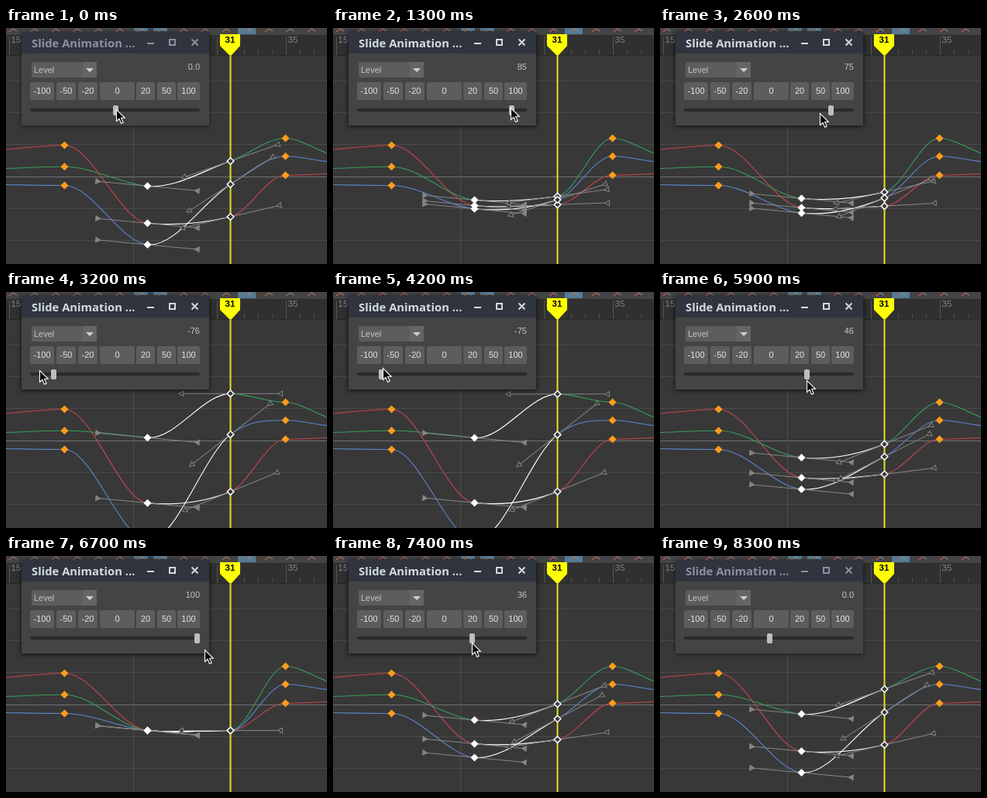
These frames come from a looping animation (414 px wide and 305 px high, 8.6 s). An HTML page with a canvas:

```html
<!DOCTYPE html>
<html lang="en">
<head>
<meta charset="utf-8">
<title>Curve slider</title>
<style>
html, body { margin: 0; width: 100%; height: 100%; overflow: hidden; background: #383838; }
#stage { position: relative; width: 414px; height: 305px; overflow: hidden; font: 11px "Liberation Sans", Arial, sans-serif; color: #c4c4c4; }
#stage * { position: absolute; box-sizing: border-box; }
#graph { left: 0; top: 0; }
#win { left: 20px; top: 5px; width: 242px; height: 121px; background: #444; box-shadow: 0 1px 5px rgba(0,0,0,.55); }
#win.active { box-shadow: 0 1px 6px rgba(0,0,0,.8); }
#bar { left: 0; top: 0; width: 242px; height: 28px; background: #2f343f; color: #8b929e; }
.active #bar { color: #d3dae3; }
#title { left: 13px; top: 3px; font: 600 14.8px/22px "Noto Sans", sans-serif; white-space: pre; }
#bar svg { left: 0; top: 0; }
#menu { left: 13px; top: 39px; width: 84px; height: 20px; background: #5d5d5d; padding-left: 3px; line-height: 20px; border-radius: 2px; }
#menu i { right: 0; top: 0; width: 18px; height: 20px; background: #656565; }
#menu i::after { content: ""; position: absolute; left: 4px; top: 8px; border: 5px solid transparent; border-top-color: #d0d0d0; border-bottom: 0; }
#value { right: 12px; top: 39px; line-height: 13px; }
.btn { top: 65px; height: 23px; background: #5d5d5d; border-radius: 2px; text-align: center; line-height: 23px; color: #e4e4e4; }
#track { left: 11px; top: 99px; width: 219px; height: 4px; background: #2a2a2a; border-radius: 2px; }
#thumb { top: 95px; left: 118px; width: 7px; height: 13px; background: #bdbdbd; border-radius: 2px; }
#cursor { left: 0; top: 0; overflow: visible; }
</style>
</head>
<body>
<div id="stage">
  <canvas id="graph" width="414" height="305"></canvas>
  <div id="win">
    <div id="bar">
      <span id="title">Slide Animation ...</span>
      <svg width="242" height="28" fill="none" stroke="currentColor" stroke-width="2">
        <path d="M162 15h9M192 10h6v7h-7v-7zM219.500 9.500l8 8m0-8l-8 8"/>
      </svg>
    </div>
    <div id="menu">Level<i></i></div>
    <span id="value">0.0</span>
    <div id="track"></div>
    <div id="thumb"></div>
  </div>
  <svg id="cursor" width="14" height="20">
    <path d="M.5 .5V15.500L4 12.300L6.600 18.300L9.200 17.200L6.600 11.300H11.300Z" fill="#000" stroke="#fff" stroke-width="1.1"/>
  </svg>
</div>
<script>
const LOOP = 8600, STEP = 100, MEAN = 225.5, FRAME = 17.85;
const X = [75.5, 182.5, 289.5, 360.5];
const $ = id => document.getElementById(id);
const ctx = $('graph').getContext('2d');

// edge heights, fixed keys and the two selected keys of each curve
const curves = [
  { color: '#c9444e', start: 157, first: 151.5, sel: [252.3, 244], last: 190.3, end: 188.5 },
  { color: '#35a05c', start: 181.5, first: 179.3, sel: [204.3, 172], last: 142.5, end: 161 },
  { color: '#5a86cc', start: 202.5, first: 203.5, sel: [280, 202], last: 165.7, end: 172.5 }
];

// time, slider value, pointer x, pointer y
const drag = [
  [0, 0, 142, 105], [200, 0, 142, 105], [500, 16, 158, 105], [800, 46, 189, 104],
  [1100, 72, 217, 104], [1300, 85, 229, 103], [1700, 100, 249, 103], [2000, 100, 257, 103],
  [2200, 100, 258, 103], [2300, 99, 244, 104], [2600, 75, 206, 110], [2800, 35, 146, 107],
  [3100, -64, 60, 102], [3400, -100, 10, 100], [3600, -100, 1, 99], [3700, -100, 1, 99],
  [4200, -75, 64, 98], [4600, -50, 90, 104], [5100, 3, 142, 108], [5400, 3, 142, 108],
  [6300, 80, 226, 118], [6500, 96, 247, 120], [6700, 100, 256, 121], [6900, 93, 240, 119],
  [7200, 46, 189, 113], [7600, 26, 168, 110], [7700, 26, 168, 110], [7800, 0, 170, 92],
  [8100, 0, 186, -25]
];

function poseAt(t) {
  const i = drag.findIndex(k => k[0] > t);
  if (i < 0) return drag[drag.length - 1];
  const a = drag[i - 1], b = drag[i];
  const u = (t - a[0]) / (b[0] - a[0]);
  return a.map((n, j) => n + (b[j] - n) * u);
}

function line(x1, y1, x2, y2, color, width = 1) {
  ctx.strokeStyle = color;
  ctx.lineWidth = width;
  ctx.beginPath();
  ctx.moveTo(x1, y1);
  ctx.lineTo(x2, y2);
  ctx.stroke();
}

function rect(x, y, w, h, color) {
  ctx.fillStyle = color;
  ctx.fillRect(x, y, w, h);
}

function poly(points, fill, stroke, width = 1) {
  ctx.beginPath();
  points.forEach(p => ctx.lineTo(...p));
  ctx.closePath();
  if (fill) { ctx.fillStyle = fill; ctx.fill(); }
  if (stroke) { ctx.strokeStyle = stroke; ctx.lineWidth = width; ctx.stroke(); }
}

function diamond(x, y, r, fill, stroke) {
  poly([[x, y - r], [x + r, y], [x, y + r], [x - r, y]], fill, stroke, 1.5);
}

// cubic with handles at a third of the span
function segment(x1, y1, s1, x2, y2, s2, color) {
  const d = (x2 - x1) / 3;
  ctx.strokeStyle = color;
  ctx.lineWidth = 1.1;
  ctx.beginPath();
  ctx.moveTo(x1, y1);
  ctx.bezierCurveTo(x1 + d, y1 + s1 * d, x2 - d, y2 - s2 * d, x2, y2);
  ctx.stroke();
}

function handles(x, y, slope, filled) {
  const color = '#858585';
  ctx.save();
  ctx.translate(x, y);
  ctx.rotate(Math.atan(slope));
  line(-64, 0, 64, 0, color);
  for (const side of [-1, 1]) {
    // filled markers point at the key, as do the hollow ones on the right
    const inward = filled || side > 0 ? 1 : -1;
    const tip = side * 64 - side * inward * 3, base = side * 64 + side * inward * 3;
    poly([[tip, 0], [base, -3.3], [base, 3.3]], filled ? color : '#383838', color);
  }
  ctx.restore();
}

// flat at extremes, otherwise limited to three times the gentler side
function autoSlope(y0, y1, y2) {
  const a = (y1 - y0) / (X[2] - X[1]), b = (y2 - y1) / (X[3] - X[2]);
  if (a * b <= 0) return 0;
  const mid = (y2 - y0) / (X[3] - X[1]);
  return Math.sign(mid) * Math.min(Math.abs(mid), 3 * Math.abs(a), 3 * Math.abs(b));
}

function drawToolbar() {
  rect(0, 0, 414, 9, '#444');
  rect(165, 0, 18, 4, '#527c96');
  rect(190, 0, 18, 4, '#527c96');
  rect(299, 0, 23, 8, '#527c96');
  for (let x = 4; x < 414; x += 27.5) {
    line(x, 5, x + 5, 1, '#b9653f', 1.3);
    line(x + 5, 1, x + 10, 4, '#9a9a9a');
  }
}

function drawRuler() {
  rect(0, 9, 414, 26, '#303030');
  ctx.font = '11.5px "Liberation Sans", Arial, sans-serif';
  for (let f = 15; f <= 38; f++) {
    const x = Math.round(X[2] + (f - 31) * FRAME) + .5;
    const major = f % 5 === 0;
    line(x, major ? 11 : 28, x, 35, major ? '#555' : '#4b4b4b');
    ctx.fillStyle = '#858585';
    if (major) ctx.fillText(f, x + 2, 19);
  }
  line(0, 35.5, 414, 35.5, '#292929');
}

function drawGraph(v) {
  rect(0, 0, 414, 305, '#383838');
  for (let y = 68.5; y < 305; y += 41.2) line(0, Math.floor(y) + .5, 414, Math.floor(y) + .5, '#4a4a4a');
  line(0, 192.5, 414, 192.5, '#747474');
  line(164.5, 35, 164.5, 305, '#4d4d4d');
  drawToolbar();
  drawRuler();

  const live = curves.map(c => {
    const [a, b] = c.sel.map(y => y + (MEAN - y) * v / 100);
    return { ...c, a, b, slope: autoSlope(a, b, c.last) };
  });
  const inSlope = .095;
  for (const c of live) {
    segment(-32, c.start + (c.start - c.first) * .3, 0, X[0], c.first, 0, c.color);
    segment(X[0], c.first, 0, X[1], c.a, inSlope, c.color);
    segment(X[2], c.b, c.slope, X[3], c.last, 0, c.color);
    segment(X[3], c.last, 0, 430, c.end + (c.end - c.last) * .2, 0, c.color);
    segment(X[1], c.a, inSlope, X[2], c.b, c.slope, '#fff');
  }
  for (const c of live) {
    handles(X[1], c.a, inSlope, true);
    handles(X[2], c.b, c.slope, false);
  }

  line(289.5, 30, 289.5, 305, '#e6e01c', 2);
  poly([[276, 8], [302, 8], [302, 23], [291, 35], [288, 35], [276, 23]], '#ffff00');
  ctx.fillStyle = '#000';
  ctx.font = 'bold 11.5px "Liberation Sans", Arial, sans-serif';
  ctx.fillText('31', 282.5, 19);

  for (const c of live) {
    diamond(X[0], c.first, 5, '#ff9c1c');
    diamond(X[3], c.last, 5, '#ff9c1c');
    diamond(X[1], c.a, 5, '#fff');
    diamond(X[2], c.b, 4.3, '#383838', '#fff');
  }
}

// label, left edge, width
[[-100, 11, 31], [-50, 45, 25], [-20, 73, 25], [0, 101, 45], [20, 148, 24], [50, 175, 24], [100, 201, 29]]
  .forEach(([label, left, width]) => {
    const b = document.createElement('div');
    b.className = 'btn';
    b.textContent = label;
    b.style.left = left + 'px';
    b.style.width = width + 'px';
    $('win').append(b);
  });

function render(t) {
  const [, raw, x, y] = poseAt(t), v = Math.round(raw);
  drawGraph(v);
  $('value').textContent = t >= 300 && t < 7800 ? v : '0.0';
  $('thumb').style.transform = `translateX(${Math.round(v * 1.05)}px)`;
  $('cursor').style.transform = `translate(${Math.round(x)}px, ${Math.round(y)}px)`;
  $('win').className = t >= 300 && t < 8300 ? 'active' : '';
}

const begin = performance.now();
let shown = -1;
function tick() {
  const t = Math.floor((performance.now() - begin) % LOOP / STEP) * STEP;
  if (t !== shown) render(shown = t);
  requestAnimationFrame(tick);
}
tick();
</script>
</body>
</html>
```
